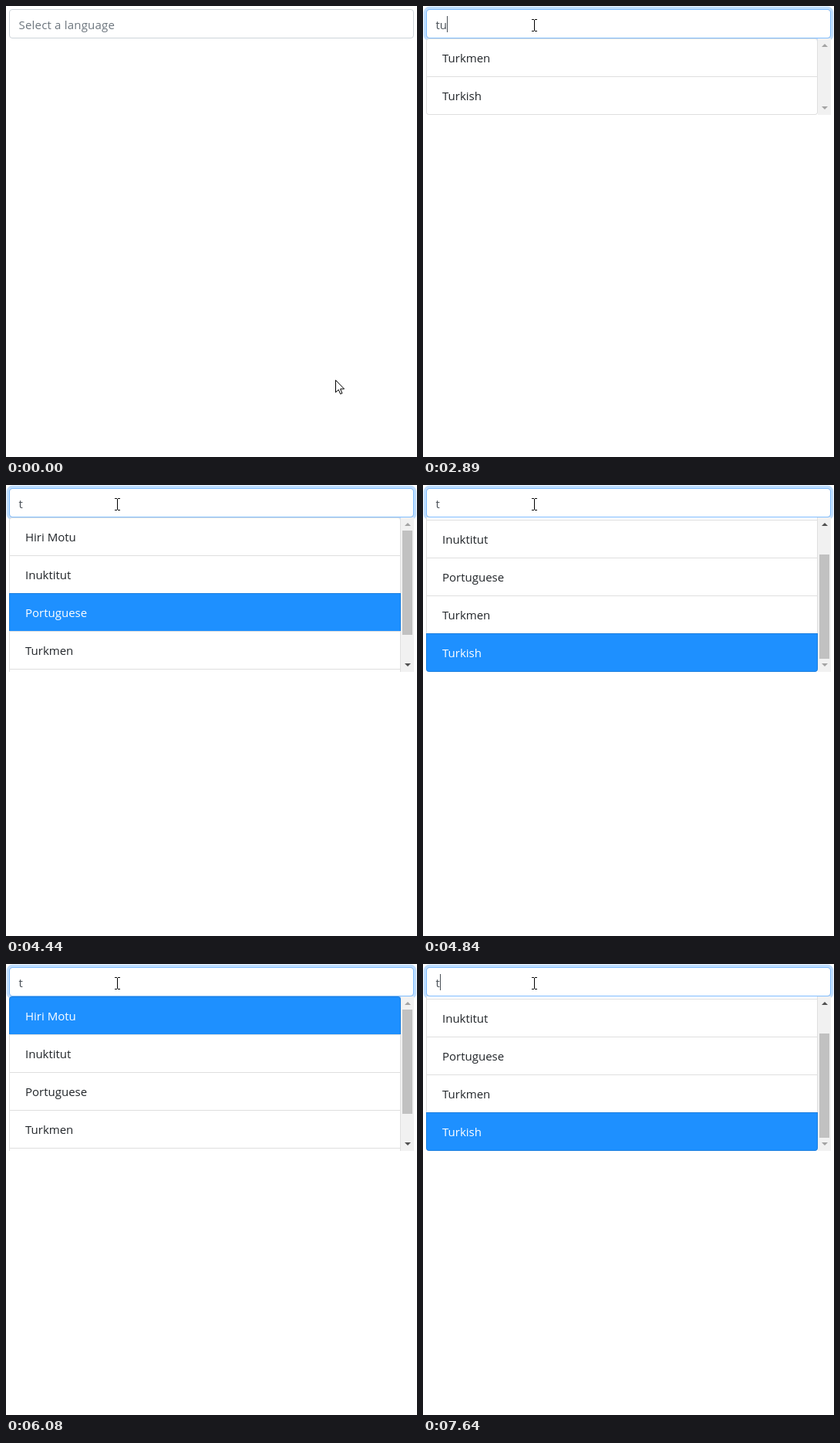
Recreate the animation shown at these times as an HTML page. Size 533 by 584 pixels, loop 8 s.

```html
<!DOCTYPE html>
<html lang="en">
<head>
<meta charset="utf-8">
<title>Language picker</title>
<style>
  html, body { margin: 0; width: 100%; height: 100%; overflow: hidden; background: #fff; }
  body { position: relative; font: 15px/24px "Open Sans", "Noto Sans", sans-serif; color: #212529; }
  div, svg { position: absolute; box-sizing: border-box; }
  #field { left: 4px; top: 4px; width: 525px; height: 38px; border: 1px solid #ced4da; border-radius: 4px; background: #fff; }
  #ring { inset: -1px; border: 1px solid #80bdff; border-radius: 4px; }
  #value { left: 11.5px; top: 7px; color: #495057; white-space: pre; }
  #value.hint { color: #6c757d; letter-spacing: .2px; }
  #caret { top: 13px; width: 1px; height: 21px; background: #495057; }
  #list { left: 4px; top: 42px; width: 525px; overflow: hidden; }
  #items { left: 0; top: 0; width: 508px; }
  .item { left: 0; width: 508px; height: 50px; padding: 12px 20px; border: 1px solid rgba(0,0,0,.125); background: #fff; }
  .item:first-child { border-radius: 4px 4px 0 0; }
  .item:last-child { border-radius: 0 0 4px 4px; }
  .item.active { background: #1e90ff; color: #fff; }
  #bar { right: 0; top: 0; width: 17px; height: 100%; background: #f1f1f1; }
  #thumb { left: 2px; width: 13px; background: #c1c1c1; }
  .tip { left: 5px; width: 8px; height: 4px; }
  #up { top: 7px; clip-path: polygon(50% 0, 100% 100%, 0 100%); }
  #down { bottom: 7px; clip-path: polygon(0 0, 100% 0, 50% 100%); }
  svg { left: 0; top: 0; overflow: visible; }
</style>
</head>
<body>
<div id="field"><div id="ring"></div><div id="value"></div></div>
<div id="caret"></div>
<div id="list">
  <div id="items"></div>
  <div id="bar"><div id="thumb"></div><div id="up" class="tip"></div><div id="down" class="tip"></div></div>
</div>
<svg id="arrow" width="12" height="19"><path d="M.5 .5V16.3L4.2 12.8 6.7 18.4 9 17.4 6.6 11.9H11.6Z" fill="#fff" stroke="#000"/></svg>
<svg id="beam" width="7" height="16"><path d="M0 .5H3M4 .5H7M3.5 1V15M0 15.5H3M4 15.5H7" fill="none" stroke="#000"/></svg>
<script>
const LOOP = 8000, ROW = 49, VIEW = 200, FOCUS = 470;
const ALL = ["Hiri Motu", "Inuktitut", "Portuguese", "Turkmen", "Turkish"];
const TUR = ALL.slice(3);
const $ = id => document.getElementById(id);

// Each step changes part of the state; caret is an x position, 0 when hidden.
const steps = [
  [0, { text: "", caret: 0, items: [], active: -1, scroll: 0 }],
  [FOCUS, { caret: 17 }],
  [1000, { caret: 0 }],
  [1320, { text: "t", caret: 22 }],
  [1640, { text: "tu", caret: 31 }],
  [1790, { text: "tur", caret: 37, items: ALL }],
  [1940, { items: TUR }],
  [2340, { caret: 0 }],
  [2890, { text: "tu", caret: 31 }],
  [3040, { items: ALL }],
  [3360, { text: "t", caret: 22 }],
  [3430, { caret: 0 }],
  [3890, { caret: 22 }],
  [4060, { active: 0 }],
  [4290, { active: 1 }],
  [4440, { active: 2, caret: 0 }],
  [4610, { active: 3 }],
  [4840, { active: 4, scroll: 46 }],
  [4990, { caret: 22 }],
  [5540, { active: 3, caret: 17 }],
  [6000, { active: 4, caret: 22 }],
  [6080, { active: 0, scroll: 0, caret: 0 }],
  [6540, { active: 1, caret: 22 }],
  [7100, { active: 0, caret: 0 }],
  [7160, { active: 4, scroll: 46 }],
  [7640, { caret: 22 }]
];

const stateAt = t => Object.assign({}, ...steps.filter(s => s[0] <= t).map(s => s[1]));
const clamp = x => Math.min(1, Math.max(0, x));
const smooth = x => x * x * (3 - 2 * x);
const place = (el, x, y) => { el.style.transform = `translate(${x}px, ${y}px)`; };

function drawList({ items, active, scroll }) {
  $("list").hidden = !items.length;
  $("list").style.display = items.length ? "block" : "none";
  if (!items.length) return;
  const full = items.length * ROW + 1, view = Math.min(full, VIEW), track = view - 34;
  $("list").style.height = view + "px";
  $("items").style.top = -scroll + "px";
  $("items").replaceChildren(...items.map((name, i) => {
    const el = document.createElement("div");
    el.className = i === active ? "item active" : "item";
    el.style.top = i * ROW + "px";
    el.textContent = name;
    return el;
  }));
  const thumb = $("thumb").style;
  thumb.display = full > view ? "block" : "none";
  thumb.top = 17 + Math.round(track * scroll / full) + "px";
  thumb.height = Math.round(track * view / full) + "px";
  $("up").style.background = scroll > 0 ? "#505050" : "#a3a3a3";
  $("down").style.background = scroll < full - view ? "#505050" : "#a3a3a3";
}

function drawPointer(t) {
  const k = t < 70 ? 0 : Math.floor((t - 70) / 76) + 1;
  const p = smooth(clamp(k / 6));
  const x = Math.round(427 - 283 * p), y = Math.round(484 - 459 * p);
  const inField = y < 42;
  $("arrow").style.display = inField ? "none" : "block";
  $("beam").style.display = inField ? "block" : "none";
  place($("arrow"), x, y);
  place($("beam"), x - 3, y - 8);
}

function drawFocus(t) {
  const p = smooth(clamp((t - FOCUS) / 150));
  $("ring").style.opacity = p ? 1 : 0;
  $("ring").style.borderColor = `rgba(128,189,255,${p})`;
  $("ring").style.boxShadow = `0 0 0 ${3.2 * p}px rgba(0,123,255,${.25 * p})`;
}

let last = "";
function draw(now) {
  const t = now % LOOP, state = stateAt(t), key = JSON.stringify(state);
  drawPointer(t);
  drawFocus(t);
  if (key !== last) {
    last = key;
    $("value").textContent = state.text || "Select a language";
    $("value").className = state.text ? "" : "hint";
    $("caret").style.display = state.caret ? "block" : "none";
    $("caret").style.left = state.caret + "px";
    drawList(state);
  }
}

const start = performance.now();
(function tick() {
  draw(performance.now() - start);
  requestAnimationFrame(tick);
})();
</script>
</body>
</html>
```
